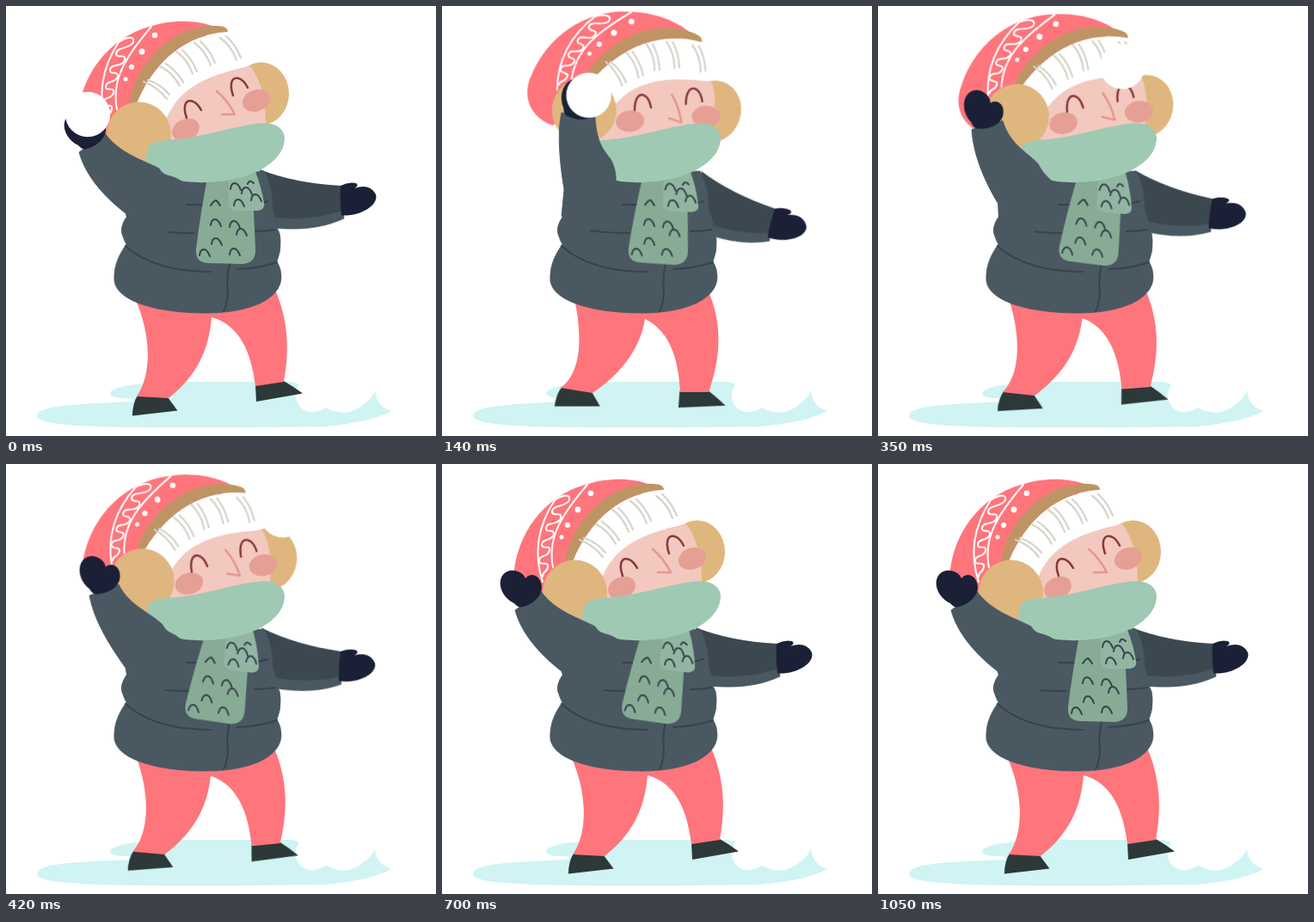
Recreate the animation shown at these times as an HTML page without scripts. Size 500 by 500 pixels, loop 1120 ms.

```html
<!DOCTYPE html>
<html lang="en">
<head>
<meta charset="utf-8">
<title>Snowball throw</title>
<style>
  html, body { margin: 0; width: 100%; height: 100%; overflow: hidden; background: #fff; }
  svg { display: block; width: 100vw; height: 100vh; }
  .line { fill: none; stroke-linecap: round; stroke-linejoin: round; }
  .coat { fill: #4a5862; stroke: #4a5862; stroke-width: .8; }
  .dark { fill: #3b4850; }
  .glove { fill: #1b2036; }
  .skin { fill: #f3c8bf; }
  .blush { fill: #e69f95; }
  .fur { fill: #e0b67f; }
  .red { fill: #ff757c; }
  .shoe { fill: #2d3838; }

  /* sixteen steps of 70 ms per loop */
  .mv { animation: 1120ms steps(2) -1ms infinite; }
  .ball { animation-name: fly; animation-timing-function: steps(16); }
  .head { animation-name: nod; transform-origin: 244px 167.5px; }
  .tail { animation-name: swing; transform-origin: 250px 179px; }
  .back-arm { animation-name: lower; transform-origin: 291px 215px; }
  .hand { animation-name: throw; transform-origin: 170px 216px; }
  .sleeve { animation-name: sleeve; }
  .legs { animation-name: legs; }
  .foot-l { animation-name: foot-l; transform-origin: 147px 476px; }
  .foot-r { animation-name: foot-r; transform-origin: 291px 459px; }

  @keyframes fly { to { transform: translate(605px, -178px); } }
  @keyframes nod {
    0%, 50%, 100% { transform: rotate(0deg); }
    12.5% { transform: rotate(19deg); animation-timing-function: steps(1); }
    18.75% { transform: rotate(22.5deg); animation-timing-function: steps(1); }
    25% { transform: rotate(19deg); }
    37.5% { transform: rotate(8.6deg); }
  }
  @keyframes swing {
    0% { transform: rotate(0deg); animation-timing-function: steps(8); }
    50% { transform: rotate(9deg); animation-timing-function: steps(7); }
    93.75%, 100% { transform: rotate(0deg); }
  }
  @keyframes lower {
    0%, 50%, 100% { transform: rotate(0deg); }
    12.5% { transform: rotate(15.6deg); }
    25% { transform: rotate(12.5deg); }
    37.5% { transform: rotate(5.2deg); }
  }
  @keyframes throw {
    0%, 50%, 100% { transform: rotate(0deg); }
    12.5% { transform: rotate(41.5deg); }
    25% { transform: rotate(29deg); }
    37.5% { transform: rotate(12deg); }
  }
  @keyframes sleeve {
    0%, 50%, 100% { d: path("M85 170C92 196 112 220 139 241L142 250L186 268L203 203C190 195 185 200 178 189C162 180 132 172 115 148Z"); }
    12.5% { d: path("M139 124C133 150 138 190 142 213L139 244L167 268L202 205C203 195 200 185 196 178C186 165 180 158 178 129Z"); }
    25% { d: path("M121 134C119 165 130 200 140 222L140 247L176 268L202 204C196 197 195 190 191 181C180 167 165 160 159 127Z"); }
    37.5% { d: path("M97 153C102 180 118 208 139 237L141 248L183 268L202 203C193 195 188 198 182 187C170 174 143 165 131 140Z"); }
  }
  @keyframes legs {
    0%, 50%, 100% { d: path("M150 340C170 385 169 430 152 454L189 456C222 430 236 400 239 362C270 370 285 400 290 442L323 437C330 400 328 365 313 330Z"); }
    12.5% { d: path("M154 340C163 385 163 425 138 444L175 450C212 425 231 395 236 364C265 378 275 410 277 449L310 449C324 410 327 370 309 330Z"); animation-timing-function: steps(6); }
  }
  @keyframes foot-l {
    0%, 50%, 100% { transform: none; }
    12.5% { transform: translate(-16px, -11px) rotate(6.5deg); animation-timing-function: steps(6); }
  }
  @keyframes foot-r {
    0%, 50%, 100% { transform: none; }
    12.5% { transform: translate(-16px, 7px) rotate(7.5deg); animation-timing-function: steps(6); }
  }
</style>
</head>
<body>
<svg viewBox="0 0 500 500">
  <defs>
    <path id="tick" d="M-6 3C-5 -6 2 -7 6 4"/>
    <path id="rib" d="M0 0Q13 9 19 26M7 -2Q18 8 24 23"/>
  </defs>

  <path fill="#cff4f3" d="M36 477C36 464 80 463 148 460Q150 456 140 456Q121 456 121 450C125 441 160 437 225 437L330 437Q338 438 341 440Q333 452 340 464Q352 479 372 467Q396 480 416 463Q427 455 429 447Q430 465 448 471Q425 484 370 489Q270 491 150 490Q36 489 36 477Z"/>

  <g class="mv back-arm">
    <path class="dark" d="M295 190Q335 206 390 209L393 240C370 247 340 250 308 247Z"/>
    <path class="coat" d="M305 246C340 250 370 246 392 238L393 247C365 260 335 261 300 257Z"/>
    <path class="glove" d="M389 209Q398 204 407 206Q411 209 405 212Q423 206 430 219C434 232 411 245 390 243.500Q388 225 389 209Z"/>
  </g>

  <path class="shoe mv foot-l" d="M153 453Q147 462 147 476.500L199.500 470.500L188 455Z"/>
  <path class="shoe mv foot-r" d="M290 441L291 460L345 450.500Q335 443 323 436Z"/>
  <path class="red mv legs" d="M150 340C170 385 169 430 152 454L189 456C222 430 236 400 239 362C270 370 285 400 290 442L323 437C330 400 328 365 313 330Z"/>

  <path class="coat" d="M200 196L150 225Q139 240 141 244Q131 258 136 268Q138 274 140 277C131 290 125 302 126 320C130 345 180 357 232 357C285 357 320 340 320 315Q320 305 315 297Q320 285 319 272Q319 264 315 258Q316 252 312 243Q309 235 309 222Q307 205 300 192Z"/>
  <path class="line" stroke="#37434c" stroke-width="2" d="M139 279Q172 309 238 309M168 260Q185 264 218 264M210 231L228 231M289 262Q302 262 313 260M269 306Q295 305 315 298M293 230L304 227M260 299Q256 318 258 334Q257 348 253 355"/>

  <g class="mv tail">
    <path fill="#88ab96" d="M236 190Q226 240 221 283Q220 299 236 299L275 300Q291 299 290 282L288 238L288 190Z"/>
    <path fill="#92b6a1" d="M259 190L259 231Q261 238 269 238L293 238Q302 236 300 229Q297 210 289 190Z"/>
    <g class="line" stroke="#37434c" stroke-width="2">
      <path d="M238 232Q242 226 244 226Q246 227 249 232"/>
      <use href="#tick" x="244" y="252"/>
      <use href="#tick" x="266" y="254"/>
      <use href="#tick" x="245" y="274"/>
      <use href="#tick" x="274" y="263"/>
      <use href="#tick" x="231" y="287"/>
      <use href="#tick" x="266" y="286"/>
      <use href="#tick" x="267" y="210"/>
      <use href="#tick" x="280" y="215"/>
      <use href="#tick" x="291" y="223"/>
      <use href="#tick" x="271" y="229"/>
      <path d="M281 207Q283 201 288 206"/>
    </g>
  </g>

  <g class="mv head">
    <ellipse class="fur" cx="296.500" cy="102" rx="32.500" ry="36.500"/>
    <path class="skin" d="M176 128C195 95 240 70 284 70Q304 95 302 150L182 178Z"/>
    <ellipse class="blush" cx="209" cy="144" rx="16.500" ry="12.500" transform="rotate(-25 209 144)"/>
    <ellipse class="blush" cx="291" cy="110" rx="16.500" ry="12.500" transform="rotate(-20 291 110)"/>
    <g class="line" stroke-width="2.500">
      <path stroke="#873a3e" d="M210 130C202 107 218 104 227 121M264 104C256 81 272 77 281 95"/>
      <path stroke="#e6968d" d="M245 99Q258 110 266 126L251 126"/>
    </g>
    <path class="red" d="M126 178C100 178 82 160 83 135C85 80 120 38 165 24.500C195 14.500 222 16.500 243 24L150 115Z"/>
    <g class="line" stroke="#fff" stroke-width="2">
      <path d="M131 42Q101 88 117 137M169 24C140 58 122 85 129 120"/>
      <path d="M131 42C140 36 150 34 148 42C145 50 128 47 128 56C129 62 140 54 138 63C135 72 121 66 121 75C121 81 131 74 130 82C128 90 116 86 116 94C116 100 127 93 125 101C123 109 113 105 113 113C113 119 125 112 123 120C122 127 117 124 117 131"/>
    </g>
    <g fill="#fff">
      <circle cx="173" cy="34" r="3.300"/>
      <circle cx="158" cy="53" r="3.400"/>
      <circle cx="146" cy="71" r="3.100"/>
      <circle cx="139" cy="85" r="2.500"/>
      <path d="M152 113C172 64 210 32 258 31Q278 45 287 66Q284 70 270 73C225 84 200 100 187 130Q165 130 152 113Z"/>
    </g>
    <path fill="#bf9464" d="M143 112C152 68 190 24 240 23Q258 22 258 30C210 32 172 64 152 113Z"/>
    <g class="line" stroke="#d5d3ca" stroke-width="2.200">
      <path d="M160 88Q176 94 187 108M165 86Q180 91 190 103"/>
      <use href="#rib" transform="translate(179 70) rotate(-9)"/>
      <use href="#rib" x="198" y="53"/>
      <use href="#rib" x="219" y="43"/>
      <use href="#rib" x="249" y="37"/>
    </g>
    <ellipse class="fur" cx="154.500" cy="149.500" rx="37.500" ry="38"/>
  </g>

  <path fill="#9fc9b3" d="M164 168Q166 158 185 156C225 154 255 142 290 137Q320 133 324 152C325 178 294 196 262 202C240 206 215 206 203 203Q165 200 163 178Z"/>

  <path class="coat mv sleeve" d="M85 170C92 196 112 220 139 241L142 250L186 268L203 203C190 195 185 200 178 189C162 180 132 172 115 148Z"/>
  <path class="glove mv hand" d="M84 162C70 155 64 140 70 130C77 120 93 123 97 133C103 125 115 129 116 143C116 155 104 164 92 166.500Q88 166.500 84 162Z"/>
  <circle class="mv ball" cx="95" cy="126" r="26.200" fill="#fff"/>
</svg>
</body>
</html>
```
